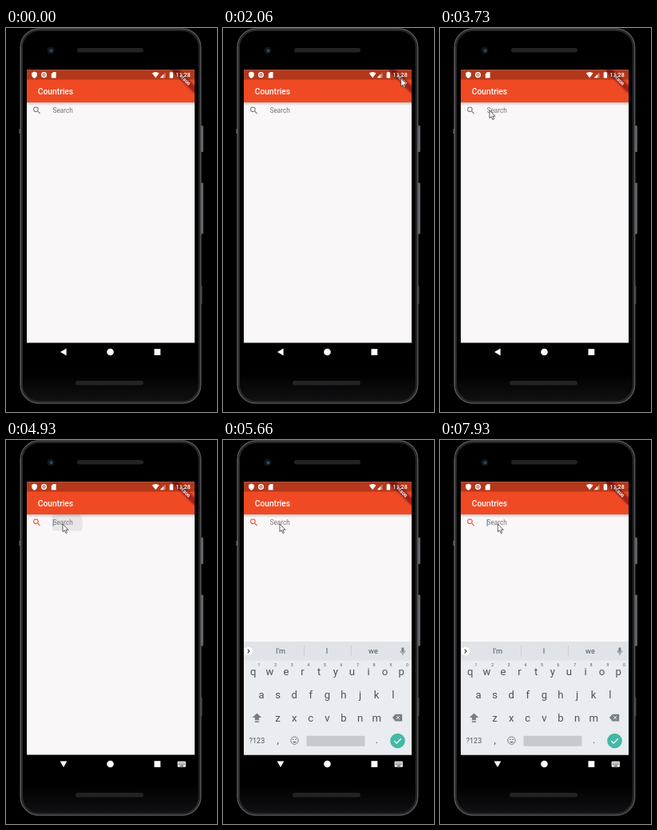
Write an HTML page that moves like this. It is 264x480 px and loops after 8 s.

```html
<!DOCTYPE html>
<html lang="en">
<head>
<meta charset="utf-8">
<title>Countries search</title>
<style>
  html, body { margin: 0; width: 100%; height: 100%; overflow: hidden; background: #000; }
  svg { display: block; width: 264px; height: 480px; font-family: Roboto, sans-serif; }
  .mid { text-anchor: middle; }
  #keyboard { fill: #4b555b; }
</style>
</head>
<body>
<svg viewBox="0 0 264 480">
  <defs>
    <linearGradient id="shade" x2="0" y2="1">
      <stop stop-color="#000" stop-opacity=".2"/>
      <stop offset="1" stop-color="#000" stop-opacity="0"/>
    </linearGradient>
    <linearGradient id="body" x2="0" y2="1">
      <stop offset=".92" stop-color="#000"/>
      <stop offset="1" stop-color="#121214"/>
    </linearGradient>
    <filter id="soft" x="-50%" y="-100%" width="200%" height="300%"><feGaussianBlur stdDeviation="1.6"/></filter>
    <clipPath id="screen"><rect x="26" y="52.5" width="210" height="341"/></clipPath>
    <clipPath id="field"><rect x="58" y="93" width="171" height="20.5"/></clipPath>
  </defs>

  <!-- Phone body -->
  <g fill="#69696e">
    <rect x="243" y="122" width="3.8" height="33" rx="1"/>
    <rect x="243" y="193.5" width="3.8" height="64" rx="1"/>
    <rect x="243" y="322" width="2.5" height="23" rx="1" fill="#3c3c40"/>
    <rect x="16.5" y="126" width="2" height="6"/>
  </g>
  <rect x="18.2" y="1" width="225.4" height="468" rx="23" fill="url(#body)" stroke="#57575b" stroke-width="1.6"/>
  <rect x="20" y="2.8" width="221.8" height="464.4" rx="21.5" fill="none" stroke="#29292c" stroke-width="2"/>
  <circle cx="56" cy="28" r="4.5" fill="#0e171d"/>
  <circle cx="56.3" cy="28.2" r="2.2" fill="#1b3646"/>
  <circle cx="56.8" cy="28.5" r=".9" fill="#4a7288"/>
  <g fill="#232325">
    <rect x="89" y="25" width="83" height="5.5" rx="2.7"/>
    <rect x="87" y="441" width="85" height="5.5" rx="2.7"/>
  </g>

  <!-- App -->
  <g clip-path="url(#screen)">
    <rect x="26" y="52" width="210" height="342" fill="#faf7f8"/>
    <g clip-path="url(#field)"><circle id="ripple" cx="70.5" cy="105"/></g>
    <path id="lens" transform="translate(32.6 97) scale(.508)" d="M15.5 14h-.79l-.28-.27A6.47 6.47 0 0 0 16 9.5 6.5 6.5 0 1 0 9.5 16c1.61 0 3.09-.59 4.23-1.57l.27.28v.79l5 4.99L20.49 19zm-6 0a4.5 4.5 0 1 1 0-9 4.5 4.5 0 0 1 0 9z"/>
    <text x="58.7" y="106" font-size="8.17" fill="#757373">Search</text>
    <rect id="caret" x="58.6" y="99" width="1" height="9" fill="#4285f4"/>
    <rect x="26" y="93" width="210" height="4" fill="url(#shade)"/>
    <rect x="26" y="52" width="210" height="41" fill="#f04a24"/>
    <text x="39.8" y="82.5" font-size="10.25" font-weight="500" fill="#fff">Countries</text>
    <g transform="translate(236 52.7) rotate(45)">
      <rect x="-20.5" y="14.2" width="41" height="6.1" fill-opacity=".5" filter="url(#soft)"/>
      <rect x="-20.5" y="14.2" width="41" height="6.1" fill="#b71c1c" fill-opacity=".63"/>
      <text class="mid" y="19.1" font-size="5.2" font-weight="900" fill="#fff">DEBUG</text>
    </g>
    <rect x="26" y="52" width="210" height="12.6" fill-opacity=".25"/>
    <g fill="#fff">
      <path d="M35.5 54.6l3.3 1.4v2.5q0 3-3.3 4.4-3.3-1.4-3.3-4.4V56z"/>
      <circle cx="47.5" cy="58.6" r="2.8" fill="none" stroke="#fff" stroke-width="1.5"/>
      <circle cx="47.5" cy="58.6" r="1.1"/>
      <path d="M59 55h3.6v7.4h-5.8v-5z"/>
      <path d="M187.2 62.2l-4.4-5.6q4.4-3.2 8.8 0z"/>
      <path d="M199.5 55.5v6.7h-6.7z" fill-opacity=".4"/>
      <path d="M197 58v4.2h-4.2z"/>
      <path d="M206 54.7h1.8v.9h1.3v7h-4.4v-7h1.3z"/>
      <text x="212.6" y="61.2" font-size="7.15" font-weight="500">11:28</text>
    </g>
  </g>

  <!-- Keyboard -->
  <g id="keyboard">
    <rect x="26" y="252" width="210" height="141.5" fill="#e9ecf0"/>
    <rect x="26" y="252" width="210" height="23.5" fill="#e0e3e7"/>
    <path d="M101.5 257v13.5M160.5 257v13.5" stroke="#c3c7cb" stroke-width=".7"/>
    <circle cx="31.8" cy="264" r="5.4" fill="#fff"/>
    <path d="M30.7 261.6l2.4 2.4-2.4 2.4" fill="none" stroke="#333" stroke-width="1.1"/>
    <g fill="#777f85">
      <rect x="223.4" y="259.3" width="3" height="6" rx="1.5"/>
      <path d="M222 263.5a2.9 2.9 0 0 0 5.8 0M224.9 266.5v2.3" fill="none" stroke="#777f85" stroke-width=".9"/>
      <path d="M42.5 341.5l5.8 5.6h-3.2v3.2h-5.2v-3.2h-3.2zM39.9 351.4h5.2v1.5h-5.2z"/>
      <path d="M215.6 342.8h8.6v8.6h-8.6l-3.6-4.3z"/>
    </g>
    <path d="M216.8 345l4.2 4.2m0-4.2l-4.2 4.2" stroke="#e9ecf0" stroke-width="1"/>
    <circle cx="89.5" cy="375.6" r="4.7" fill="none" stroke="#687178" stroke-width=".9"/>
    <path d="M87 377a2.8 2.4 0 0 0 5 0z"/>
    <circle cx="87.9" cy="374.2" r=".75"/><circle cx="91.1" cy="374.2" r=".75"/>
    <rect x="104.5" y="369.8" width="73" height="13" rx="1.5" fill="#c6cacf"/>
    <circle cx="218.5" cy="376" r="9.3" fill="#43b9a6"/>
    <path d="M214.3 376.2l2.9 2.9 5.6-5.8" fill="none" stroke="#fff" stroke-width="1.3"/>
  </g>

  <!-- Navigation bar -->
  <g fill="#fff">
    <path id="back" d="M68 405l7.6-4.4v8.8z"/>
    <circle cx="130.5" cy="405" r="4.3"/>
    <rect x="185.5" y="401.2" width="7.8" height="7.8"/>
    <g id="switcher">
      <rect x="214.7" y="401.7" width="10.2" height="7" rx=".8"/>
      <path d="M216 403.7h7.8M216 405.5h7.8" stroke="#000" stroke-width=".9" stroke-dasharray="1 .7"/>
      <path d="M217.5 407.4h4.6" stroke="#000" stroke-width=".8"/>
    </g>
  </g>
  <path id="pointer" d="M0 0v9.8l2.2-2 1.7 3.8 1.6-.7-1.7-3.7H7z" fill="#fff" stroke="#222" stroke-width=".7"/>
</svg>
<script>
const LOOP = 8000, TAP = 4860, BLINK = 5400;
const $ = id => document.getElementById(id);
const set = (id, attrs) => {
  for (const name in attrs) $(id).setAttribute(name, attrs[name]);
};
const clamp = v => Math.min(1, Math.max(0, v));

function label(text, x, y, size) {
  const el = document.createElementNS('http://www.w3.org/2000/svg', 'text');
  el.textContent = text;
  el.setAttribute('class', 'mid');
  el.setAttribute('x', x);
  el.setAttribute('y', y);
  el.setAttribute('font-size', size);
  $('keyboard').append(el);
}

const STEP = 20.6;
const row = (keys, x, y, size) =>
  [...keys].forEach((key, i) => label(key, x + i * STEP, y, size));
row('qwertyuiop', 37.8, 293.8, 13.2);
row('1234567890', 45, 283, 5);
row('asdfghjkl', 48, 322.8, 13.2);
row('zxcvbnm', 68.6, 351.6, 13.2);
["I'm", 'I', 'we'].forEach((word, i) => label(word, 72 + i * 58, 267.2, 9.2));
label('?123', 42.5, 379.2, 9);
label(',', 68.6, 379, 12);
label('.', 192.5, 379, 12);

// Pointer tip: time, x, y. Equal times make a jump.
const path = [
  [1660, 234, 31], [1860, 229, 45], [2060, 223, 63], [2260, 172, 90],
  [2460, 112, 109], [2700, 80, 98], [2930, 67, 89], [3200, 56, 103],
  [3460, 56, 103], [3460, 62, 103], [4530, 62, 103], [4530, 71, 105],
  [5700, 71, 105], [5700, 72.3, 105], [LOOP, 72.3, 105]
];

function pointerAt(t) {
  const i = path.findIndex(p => p[0] > t);
  const [a, b] = [path[i - 1], path[i]];
  const k = (t - a[0]) / (b[0] - a[0]);
  return [a[1] + (b[1] - a[1]) * k, a[2] + (b[2] - a[2]) * k];
}

function draw(t) {
  const focused = t >= TAP;
  const show = on => on ? 'visible' : 'hidden';

  set('pointer', { visibility: show(t >= path[0][0]) });
  if (t >= path[0][0]) set('pointer', { transform: `translate(${pointerAt(t)})` });

  set('lens', { fill: focused ? '#f04a24' : '#787676' });
  set('switcher', { visibility: show(focused) });
  set('back', { transform: focused ? 'rotate(-90 72 405)' : '' });

  const caretOn = t < BLINK || Math.floor((t - BLINK + 5) / 507) % 2 === 1;
  set('caret', { visibility: show(focused && caretOn) });

  set('ripple', {
    r: Math.max(0, 25 + (t - 4930) * 0.5),
    'fill-opacity': focused ? 0.07 * (1 - clamp((t - 4950) / 200)) : 0
  });

  const slide = 20 * (1 - clamp((t - 4940) / 180)) ** 2;
  set('keyboard', {
    opacity: clamp((t - 4940) / 100),
    transform: `translate(0 ${slide})`
  });
}

function tick() {
  draw(performance.now() % LOOP);
  requestAnimationFrame(tick);
}
tick();
</script>
</body>
</html>
```
